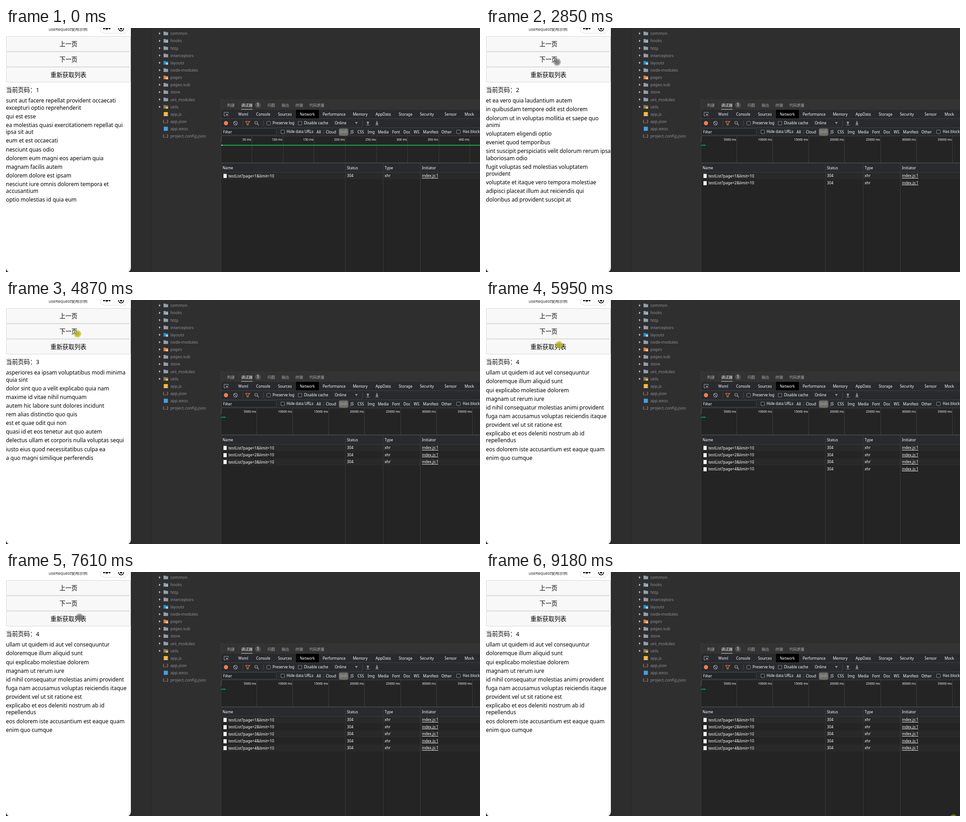
Write an HTML page with a canvas that moves like this. It is 1044 px wide and 537 px high and loops after 9.24 s.

```html
<!DOCTYPE html>
<html lang="zh-CN">
<head>
<meta charset="utf-8">
<title>useRequest</title>
<style>
  html, body { margin: 0; width: 100%; height: 100%; overflow: hidden; background: #2e2e2e; }
  canvas { display: block; }
</style>
</head>
<body>
<canvas id="stage" width="1044" height="537"></canvas>
<script>
const ctx = document.getElementById('stage').getContext('2d', { alpha: false });
const LOOP = 9240;
const FONT = '"Noto Sans", "Noto Sans CJK SC", "Noto Sans CJK", sans-serif';

// One item per line; "|" marks a wrapped line.
const PAGES = [
`sunt aut facere repellat provident occaecati|excepturi optio reprehenderit
qui est esse
ea molestias quasi exercitationem repellat qui|ipsa sit aut
eum et est occaecati
nesciunt quas odio
dolorem eum magni eos aperiam quia
magnam facilis autem
dolorem dolore est ipsam
nesciunt iure omnis dolorem tempora et|accusantium
optio molestias id quia eum`,
`et ea vero quia laudantium autem
in quibusdam tempore odit est dolorem
dolorum ut in voluptas mollitia et saepe quo|animi
voluptatem eligendi optio
eveniet quod temporibus
sint suscipit perspiciatis velit dolorum rerum ipsa|laboriosam odio
fugit voluptas sed molestias voluptatem|provident
voluptate et itaque vero tempora molestiae
adipisci placeat illum aut reiciendis qui
doloribus ad provident suscipit at`,
`asperiores ea ipsam voluptatibus modi minima|quia sint
dolor sint quo a velit explicabo quia nam
maxime id vitae nihil numquam
autem hic labore sunt dolores incidunt
rem alias distinctio quo quis
est et quae odit qui non
quasi id et eos tenetur aut quo autem
delectus ullam et corporis nulla voluptas sequi
iusto eius quod necessitatibus culpa ea
a quo magni similique perferendis`,
`ullam ut quidem id aut vel consequuntur
doloremque illum aliquid sunt
qui explicabo molestiae dolorem
magnam ut rerum iure
id nihil consequatur molestias animi provident
fuga nam accusamus voluptas reiciendis itaque
provident vel ut sit ratione est
explicabo et eos deleniti nostrum ab id|repellendus
eos dolorem iste accusantium est eaque quam
enim quo cumque`];

const CLICKS = [
  { button: 1, page: 2, press: 2130, send: 2260, release: 2260, done: 2780, shown: 2850 },
  { button: 1, page: 3, press: 3380, send: 3520, release: 3590, done: 3790, shown: 3790 },
  { button: 1, page: 4, press: 4810, send: 4880, release: 4990, done: 4990, shown: 4990 },
  { button: 2, page: 4, press: 5950, send: 6080, release: 6150, done: 6220, shown: 6220 },
];

// start, end, steps, from x, y, to x, y, bow
const MOVES = [
  [0, 0, 1, 1040, 560, 1040, 560, 0],
  [260, 860, 9, 943, 521, 130, 101, -30],
  [930, 1070, 3, 136, 100.5, 148, 99.5, 0],
  [1530, 1730, 4, 149, 97, 155, 75.5, 0],
  [1930, 1930, 1, 155, 75.5, 156, 75.5, 0],
  [2130, 2130, 1, 156, 75.5, 156.5, 75, 0],
  [3380, 3380, 1, 156.5, 75, 157, 75, 0],
  [4650, 4650, 1, 157, 75, 157.5, 74.5, 0],
  [5280, 5620, 6, 157.5, 76, 160.5, 98.5, 0],
  [5950, 5950, 1, 160.5, 98.5, 161, 98.5, 0],
  [7610, 8510, 14, 162, 99.5, 1060, 565, 0],
  [8840, 8840, 1, 1040, 544.5, 1040, 544.5, 0],
  [8910, 8910, 1, 1040, 560, 1040, 560, 0],
  [9180, 9180, 1, 1029.5, 541.5, 1029.5, 541.5, 0],
];

function rect(x, y, w, h, color) {
  ctx.fillStyle = color;
  ctx.fillRect(x, y, w, h);
}

function box(x, y, w, h, radius, fill, stroke) {
  ctx.beginPath();
  ctx.roundRect(x, y, w, h, radius);
  if (fill) { ctx.fillStyle = fill; ctx.fill(); }
  if (stroke) { ctx.strokeStyle = stroke; ctx.lineWidth = 1; ctx.stroke(); }
}

function disc(x, y, r, color) {
  ctx.beginPath();
  ctx.arc(x, y, r, 0, 7);
  ctx.fillStyle = color;
  ctx.fill();
}

function ring(x, y, r, color, width = 1) {
  ctx.beginPath();
  ctx.arc(x, y, r, 0, 7);
  ctx.strokeStyle = color;
  ctx.lineWidth = width;
  ctx.stroke();
}

function lines(color, width, ...paths) {
  ctx.strokeStyle = color;
  ctx.lineWidth = width;
  ctx.beginPath();
  for (const [x, y, ...rest] of paths) {
    ctx.moveTo(x, y);
    for (let i = 0; i < rest.length; i += 2) ctx.lineTo(rest[i], rest[i + 1]);
  }
  ctx.stroke();
}

function shape(color, x, y, ...rest) {
  ctx.fillStyle = color;
  ctx.beginPath();
  ctx.moveTo(x, y);
  for (let i = 0; i < rest.length; i += 2) ctx.lineTo(rest[i], rest[i + 1]);
  ctx.fill();
}

// y is the visual middle of the line
function text(str, x, y, size, color, align = 'left', weight = 400) {
  ctx.font = `${weight} ${size}px ${FONT}`;
  ctx.textAlign = align;
  ctx.fillStyle = color;
  ctx.fillText(str, x, Math.round(y + size * 0.36));
}

const label = (str, x, y, color = '#fff') => text(str, x, y, 8.25, color, 'left', 500);

function drawPhone(t) {
  box(0, -40, 275, 578, 10, '#fff');
  text('useRequest使用示例', 94, 2.5, 9, '#222');
  box(206.5, -11.5, 63, 23, 11.5, '#fff', '#dcdcdc');
  disc(216, 1, 2, '#000');
  disc(222, 1, 2.7, '#000');
  disc(228, 1, 2, '#000');
  ring(253.5, 1, 5.5, '#000', 1.6);
  disc(253.5, 1, 2.4, '#000');

  ['上一页', '下一页', '重新获取列表'].forEach((name, i) => {
    const pressed = CLICKS.some(c => c.button === i && t >= c.press + 70 && t < c.release);
    box(0.5, 18.5 + i * 33.8, 274, 33, 3, pressed ? '#dedede' : '#f8f8f8', '#d4d4d4');
    text(name, 137.5, 35.5 + i * 33.8, 13.2, pressed ? '#666' : '#000', 'center');
  });

  if (CLICKS.some(c => t >= c.send && t < c.shown)) {
    text('loading...', 0, 127.5, 11.95, '#000');
    return;
  }
  const page = CLICKS.reduce((p, c) => t >= c.shown ? c.page : p, 1);
  text('当前页码：', 0, 136, 13.2, '#000');
  text(page, 66, 136, 12.6, '#000');
  let y = 160;
  for (const item of PAGES[page - 1].split('\n')) {
    item.split('|').forEach((line, i) => {
      if (i) y += 15.4;
      text(line, 0, y, 11.95, '#000');
    });
    y += 19.1;
  }
}

function folder(y, color) {
  shape(color, 347, y - 4, 351, y - 4, 352.5, y - 2.8, 357, y - 2.8, 357, y + 4, 347, y + 4);
}

function drawTree() {
  rect(275, 0, 46, 537, '#2d2d2d');
  rect(321, 0, 152, 537, '#2f2f2f');
  rect(320, 0, 1, 537, '#272727');
  const gray = '#90a0aa';
  const tints = { layouts: '#1e94d4', pages: '#f5793b', utils: '#8a7d62' };
  const badges = { hooks: '#b0bec5', layouts: '#a9dcf5', pages: '#ffd0a8', utils: '#d6c64c' };
  const names = ['', 'common', 'hooks', 'http', 'interceptors', 'layouts', 'node-modules', 'pages',
    'pages-sub', 'store', 'uni_modules', 'utils', 'app.js', 'app.json', 'app.wxss', 'project.config.json'];
  names.forEach((name, i) => {
    const y = 12 + (i - 1) * 16.14;
    text(name, 362, y, 9, '#8d9093');
    if (i < 12) {
      shape('#b9cdd6', 337, y - 2.5, 340.5, y, 337, y + 2.5);
      folder(y, tints[name] || gray);
      if (badges[name]) rect(352, y, 5, 4, badges[name]);
    } else if (name.endsWith('.json')) {
      text('{..}', 351.5, y - 0.5, 9.5, '#e2b04a', 'center', 500);
    } else {
      rect(347.5, y - 4.5, 9, 9, name === 'app.js' ? '#eebb45' : '#3ba3e0');
    }
  });
}

function drawTabs() {
  rect(473, 0, 571, 158, '#2e2e2e');
  rect(473, 158, 571, 22, '#333');
  rect(473, 157.5, 571, 1, '#3b3b3b');
  [['构建', 487], ['调试器', 518], ['问题', 576], ['输出', 607], ['终端', 637.5], ['代码质量', 668]]
    .forEach(([name, x]) => text(name, x, 169.5, 8.35, x === 518 ? '#fff' : '#a8a8a8'));
  rect(518, 178.5, 25, 1, '#ddd');
  disc(555, 169.5, 6.5, '#505050');
  text('5', 555, 169.5, 8, '#fff', 'center');

  rect(473, 180, 571, 58, '#292a2d');
  rect(473, 199, 571, 1, '#404144');
  rect(473, 219, 571, 1, '#404144');
  rect(639, 180, 50, 19, '#000');
  lines('#9aa0a6', 1, [484, 193.5, 480.5, 193.5, 480.5, 185.5, 489.5, 185.5, 489.5, 188], [490, 194, 486, 190]);
  shape('#9aa0a6', 484.5, 188.5, 489.5, 190, 486, 193.5);
  [['Wxml', 511.5], ['Console', 551], ['Sources', 599], ['Network', 647], ['Performance', 697.5],
    ['Memory', 764], ['AppData', 814], ['Storage', 865], ['Security', 911.5], ['Sensor', 966], ['Mock', 1010]]
    .forEach(([name, x]) => label(name, x, 190));
}

const checkbox = (x, y) => box(x + 0.5, y - 4, 8, 8, 1.5, '#242424', '#85888c');

function drawToolbar() {
  const gray = '#9aa0a6', orange = '#f08042';
  disc(484.5, 209.5, 4.7, orange);
  ring(505.5, 209.5, 4.2, gray, 1.2);
  lines(gray, 1.2, [502.5, 206.5, 508.5, 212.5]);
  lines(orange, 1.2, [527.5, 205.5, 537, 205.5, 533.5, 210, 533.5, 213.5, 531, 213.5, 531, 210, 527.5, 205.5]);
  ring(551, 208.5, 3, gray, 1.2);
  lines(gray, 1.4, [553.3, 210.8, 557, 214.3]);
  for (const x of [521, 567, 785]) rect(x, 204, 1, 11, '#484a4e');
  checkbox(574, 209.5);
  label('Preserve log', 587, 209.5);
  checkbox(643, 209.5);
  label('Disable cache', 656.5, 209.5);
  label('Online', 724, 209.5);
  shape(gray, 769, 207, 774.5, 207, 771.7, 211.5);
  for (const [x, d] of [[797, -1], [817, 1]]) {
    shape(gray, x - 3.5, 209 + d * 0.3, x + 3.5, 209 + d * 0.3, x, 209 + d * 4);
    rect(x - 1, d < 0 ? 208 : 205, 2, 4, gray);
    rect(x - 3.5, 213, 7, 1, gray);
  }

  box(474.5, 221.5, 121, 14, 1, '#232425', '#37454f');
  label('Filter', 478, 229);
  checkbox(605, 228.5);
  label('Hide data URLs', 618, 228.5);
  rect(699, 224, 1, 10, '#484a4e');
  box(733, 221, 21, 16, 4, '#6c6c6a');
  [['All', 684], ['Cloud', 704.5], ['XHR', 735], ['JS', 759], ['CSS', 774], ['Img', 796.5], ['Media', 819],
    ['Font', 850.5], ['Doc', 875.5], ['WS', 898], ['Manifest', 918.5], ['Other', 959]]
    .forEach(([name, x]) => label(name, x, 229.5, name === 'XHR' ? '#a3a3a1' : '#fff'));
  checkbox(992, 228.5);
  label('Has blocked cookies', 1006, 228.5);
}

function drawNetwork(t) {
  rect(473, 238, 571, 299, '#242424');
  rect(473, 237, 571, 1, '#404144');
  const rescaled = t >= CLICKS[0].send;
  const gap = rescaled ? 79.2 : 68.6, unit = rescaled ? 5000 : 50;
  for (let i = 1; 473 + i * gap < 1044; i++) {
    const x = 473 + i * gap;
    rect(Math.floor(x), 238, 1, 59, '#3c3c3c');
    text(`${i * unit} ms`, x - 1.5, 245.5, 6.8, '#fff', 'right', 500);
  }
  rect(473, 238, 1.5, 12, '#77797c');
  if (rescaled) {
    rect(474, 257, 10, 2, '#0f9a50');
  } else {
    rect(473, 257, 571, 2, '#0cb04a');
    rect(473, 257, 4, 2, '#b9d7c8');
  }

  rect(473, 296, 571, 2, '#434447');
  rect(473, 298, 571, 19, '#292a2d');
  const rows = [{ page: 1, done: 0 }, ...CLICKS.filter(c => t >= c.send)];
  rows.forEach((row, i) => {
    if (i % 2 === 0) rect(473, 317.5 + i * 15.5, 571, 15.5, '#292929');
  });
  rect(473, 317, 571, 1, '#3c3d40');
  for (const x of [747, 830, 912]) rect(x, 298, 1, 239, '#3a3b3d');
  rect(473, 158, 1, 379, '#3a3a3a');
  [['Name', 477], ['Status', 751], ['Type', 834], ['Initiator', 916]]
    .forEach(([name, x]) => label(name, x, 308.5));
  rows.forEach((row, i) => {
    const y = 325.5 + i * 15.5;
    const pending = t < row.done;
    rect(479, Math.round(y - 4.5), 7, 9, '#fff');
    text(`testList?page=${row.page}&limit=10`, 490, y, 8.5, '#fff', 'left', 500);
    label(pending ? '(pending)' : '304', 751, y, pending ? '#9aa0a6' : '#fff');
    label('xhr', 834, y);
    label('index.js:1', 916, y);
    rect(916, Math.round(y + 4), 36, 1, '#e8e8e8');
  });
}

function drawCursor(t) {
  const [start, end, steps, x0, y0, x1, y1, bow] = MOVES.findLast(m => t >= m[0]);
  const last = steps - 1;
  const u = last ? Math.min(last, Math.floor((t - start) / (end - start) * last + 1e-6)) / last : 1;
  const p = u * u * (3 - 2 * u);
  const x = x0 + (x1 - x0) * p;
  const y = y0 + (y1 - y0) * p + bow * 4 * p * (1 - p);
  const pressed = t >= 9180 || CLICKS.some(c => t >= c.press && t < c.release);
  const rgb = pressed ? '178,176,0' : '112,110,110';
  const glow = ctx.createRadialGradient(x, y, 0, x, y, 8.8);
  glow.addColorStop(0, `rgba(${rgb},.9)`);
  glow.addColorStop(0.5, `rgba(${rgb},.8)`);
  glow.addColorStop(0.85, `rgba(${rgb},.45)`);
  glow.addColorStop(1, `rgba(${rgb},.1)`);
  disc(x, y, 8.8, glow);
}

function frame(now) {
  const t = now % LOOP;
  rect(0, 0, 1044, 537, '#2d2d2d');
  drawTree();
  drawPhone(t);
  drawTabs();
  drawToolbar();
  drawNetwork(t);
  drawCursor(t);
  requestAnimationFrame(frame);
}
requestAnimationFrame(frame);
</script>
</body>
</html>
```
